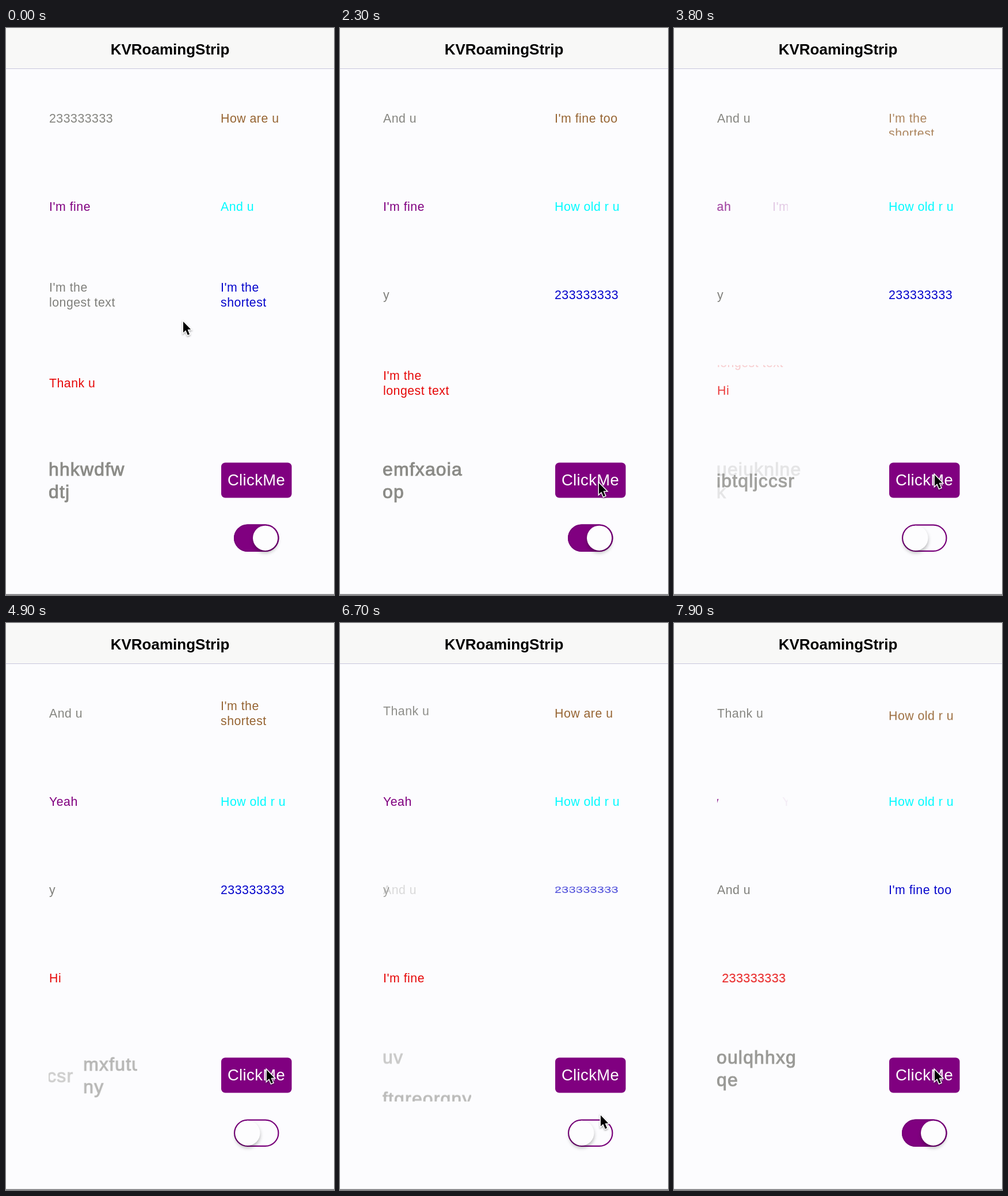
Recreate the animation shown at these times as an HTML page with a canvas. Size 570 by 983 pixels, loop 8000 ms.

```html
<!DOCTYPE html>
<html lang="en">
<head>
<meta charset="utf-8">
<title>Ticker labels</title>
<style>
  html, body { margin: 0; width: 100%; height: 100%; overflow: hidden; background: #fcfcfe; }
  canvas { display: block; }
</style>
</head>
<body>
<canvas id="stage" width="570" height="983"></canvas>
<script>
const ctx = document.getElementById('stage').getContext('2d');
const LOOP = 8000, TICK = 100;
const FAMILY = '"Liberation Sans", Arial, sans-serif';
const PURPLE = '#800080';

// "weight" thickens the regular face to a medium one
const small = { font: '21.3px ' + FAMILY, spacing: '0.5px', weight: 0, line: 25.5, drop: 8, w: 121.6, h: 61 };
const large = { font: '31.9px ' + FAMILY, spacing: '1.2px', weight: 1, line: 38.6, drop: 11.5, w: 153, h: 91 };

// Each step: start ms, text, way in, duration ms
const labels = [
  { x: 74.5, y: 156, style: small, color: '#858580', text: '233333333', steps: [
    [1450, 'And u', 'top', 800],
    [5860, 'Thank u', 'top', 1000]] },
  { x: 373, y: 156, style: small, color: '#966432', text: 'How are u', steps: [
    [1450, "I'm fine too", 'bottom', 800],
    [3095, "I'm the|shortest", 'bottom', 1000],
    [5150, 'How are u', 'bottom', 1000],
    [7060, 'How old r u', 'bottom', 1000]] },
  { x: 74.5, y: 309, style: small, color: PURPLE, text: "I'm fine", steps: [
    [3095, 'Yeah', 'left', 1000],
    [7060, 'y', 'left', 1000]] },
  { x: 373, y: 309, style: small, color: '#00fbff', text: 'And u', steps: [
    [1450, 'How old r u', 'right', 800]] },
  { x: 74.5, y: 462, style: small, color: '#7f7f7b', text: "I'm the|longest text", steps: [
    [1450, 'y', 'fade', 800],
    [6355, 'And u', 'fade', 1000]] },
  { x: 373, y: 462, style: small, color: '#0505cc', text: "I'm the|shortest", steps: [
    [1450, '233333333', 'squash', 800],
    [6355, "I'm fine too", 'squash', 1000]] },
  { x: 74.5, y: 615, style: small, color: '#e60808', text: 'Thank u', steps: [
    [1450, "I'm the|longest text", 'right', 800],
    [3095, 'Hi', 'bottom', 1000],
    [5150, "I'm fine", 'squash', 1000],
    [7060, '233333333', 'right', 1000]] },
  { x: 74, y: 783.5, style: large, color: '#8b8b87', text: 'hhkwdfw|dtj', steps: [
    [960, 'shwhqexg|xp', 'top', 700],
    [1660, 'emfxaoia|op', 'fade', 630],
    [2450, 'ueiuknlne|k', 'bottom', 700],
    [3300, 'ibtqljccsr', 'fade', 700],
    [4500, 'mxfutumb|ny', 'right', 700],
    [5660, 'ftgreorgny', 'left', 700],
    [6380, 'kdarwmzo|uv', 'top', 700],
    [7360, 'oulqhhxg|qe', 'top', 700]] }
];

const pointerPath = [
  [0, 308, 509], [300, 308, 509], [1100, 450, 789], [2350, 450, 789],
  [2750, 453, 890], [3200, 453, 890], [3600, 453, 775], [6450, 453, 775],
  [6850, 453, 890], [7300, 453, 890], [7700, 453, 775], [LOOP, 453, 775]
];

const ways = { top: [0, -1], bottom: [0, 1], left: [-1, 0], right: [1, 0], fade: [0, 0], squash: [0, 0] };

const clamp = v => Math.max(0, Math.min(1, v));
const ease = v => { v = clamp(v); return v * v * (3 - 2 * v); };
const mix = (a, b, p) => a + (b - a) * p;

function pill(x, y, w, h, r) {
  ctx.beginPath();
  ctx.roundRect(x, y, w, h, r);
}

function setFont(font, spacing, align) {
  ctx.font = font;
  ctx.letterSpacing = spacing;
  ctx.textAlign = align;
}

// Text is drawn on its own layer so that fill and stroke fade as one
const layer = document.createElement('canvas').getContext('2d');
layer.canvas.width = 170;
layer.canvas.height = 140;

function drawText(style, color, text, dx, dy, alpha, scaleY) {
  if (alpha <= 0) return;
  const { width, height } = layer.canvas, lines = text.split('|');
  layer.clearRect(0, 0, width, height);
  layer.font = style.font;
  layer.letterSpacing = style.spacing;
  layer.fillStyle = layer.strokeStyle = color;
  layer.lineWidth = style.weight;
  lines.forEach((s, i) => {
    const y = height / 2 + (i - (lines.length - 1) / 2) * style.line + style.drop;
    layer.fillText(s, 1, y);
    if (style.weight) layer.strokeText(s, 1, y);
  });
  ctx.save();
  ctx.globalAlpha = alpha;
  ctx.translate(dx, dy);
  ctx.scale(1, scaleY);
  ctx.drawImage(layer.canvas, -1, -height / 2);
  ctx.restore();
}

function drawLabel({ x, y, style, color, text, steps }, t) {
  let old = text, now = text, way = 'fade', p = 1;
  for (const [start, next, mode, span] of steps) {
    if (t < start) break;
    old = now;
    now = next;
    way = mode;
    p = ease((t - start) / span);
  }
  const [sx, sy] = ways[way], { w, h } = style;
  const tall = q => way === 'squash' ? q : 1;
  ctx.save();
  ctx.translate(Math.round(x), Math.round(y));
  ctx.beginPath();
  ctx.rect(0, -h / 2, w + 1, h);
  ctx.clip();
  drawText(style, color, old, -sx * w * p, -sy * h * p, 1 - p, tall(1 - p));
  drawText(style, color, now, sx * w * (1 - p), sy * h * (1 - p), p, tall(p));
  ctx.restore();
}

function drawBar() {
  ctx.fillStyle = '#f8f8f7';
  ctx.fillRect(0, 0, 570, 70);
  ctx.fillStyle = '#c8c6dc';
  ctx.fillRect(0, 70, 570, 1);
  ctx.fillStyle = '#000';
  setFont('bold 26px ' + FAMILY, '0px', 'center');
  ctx.fillText('KVRoamingStrip', 285, 46);
  ctx.fillStyle = '#77777a';
  ctx.fillRect(0, 981.5, 570, 1.5);
}

function drawButton() {
  ctx.fillStyle = PURPLE;
  pill(374, 753.5, 122.5, 61, 7);
  ctx.fill();
  ctx.fillStyle = '#fff';
  setFont('27.4px ' + FAMILY, '0.4px', 'center');
  ctx.fillText('ClickMe', 435, 793);
}

function drawSwitch(t) {
  const on = 1 - ease((t - 2900) / 300) + ease((t - 7000) / 300);
  pill(396, 860.5, 78.5, 47.5, 23.75);
  ctx.fillStyle = '#fcfcfe';
  ctx.fill();
  ctx.globalAlpha = on;
  ctx.fillStyle = PURPLE;
  ctx.fill();
  ctx.globalAlpha = 1;
  pill(397.1, 861.6, 76.3, 45.3, 22.65);
  ctx.strokeStyle = '#78007a';
  ctx.lineWidth = 2.2;
  ctx.stroke();
  ctx.save();
  ctx.shadowColor = 'rgba(0,0,0,0.28)';
  ctx.shadowBlur = 6;
  ctx.shadowOffsetY = 4;
  ctx.fillStyle = '#fdfdfe';
  ctx.beginPath();
  ctx.arc(mix(420, 450.6, on), 884.3, 21.6, 0, Math.PI * 2);
  ctx.fill();
  ctx.restore();
}

function drawPointer(t) {
  const i = pointerPath.findIndex((k, n) => n > 0 && t < k[0]);
  const [t0, x0, y0] = pointerPath[i - 1], [t1, x1, y1] = pointerPath[i];
  const p = ease((t - t0) / (t1 - t0));
  ctx.save();
  ctx.translate(mix(x0, x1, p), mix(y0, y1, p));
  ctx.beginPath();
  ctx.moveTo(0, 0);
  ctx.lineTo(0, 19);
  ctx.lineTo(4.3, 15);
  ctx.lineTo(7.8, 23.3);
  ctx.lineTo(11, 22);
  ctx.lineTo(7.5, 13.8);
  ctx.lineTo(13.2, 13.6);
  ctx.closePath();
  ctx.shadowColor = 'rgba(0,0,0,0.35)';
  ctx.shadowBlur = 3;
  ctx.shadowOffsetY = 1.5;
  ctx.strokeStyle = '#fff';
  ctx.lineWidth = 3;
  ctx.stroke();
  ctx.shadowColor = 'transparent';
  ctx.fillStyle = '#000';
  ctx.fill();
  ctx.restore();
}

function draw(t) {
  ctx.fillStyle = '#fcfcfe';
  ctx.fillRect(0, 0, 570, 983);
  drawBar();
  labels.forEach(label => drawLabel(label, t));
  drawButton();
  drawSwitch(t);
  drawPointer(t);
}

const begin = performance.now();
function frame(now) {
  const t = Math.max(0, now - begin) % LOOP;
  draw(Math.floor(t / TICK) * TICK);
  requestAnimationFrame(frame);
}
draw(0);
requestAnimationFrame(frame);
</script>
</body>
</html>
```
